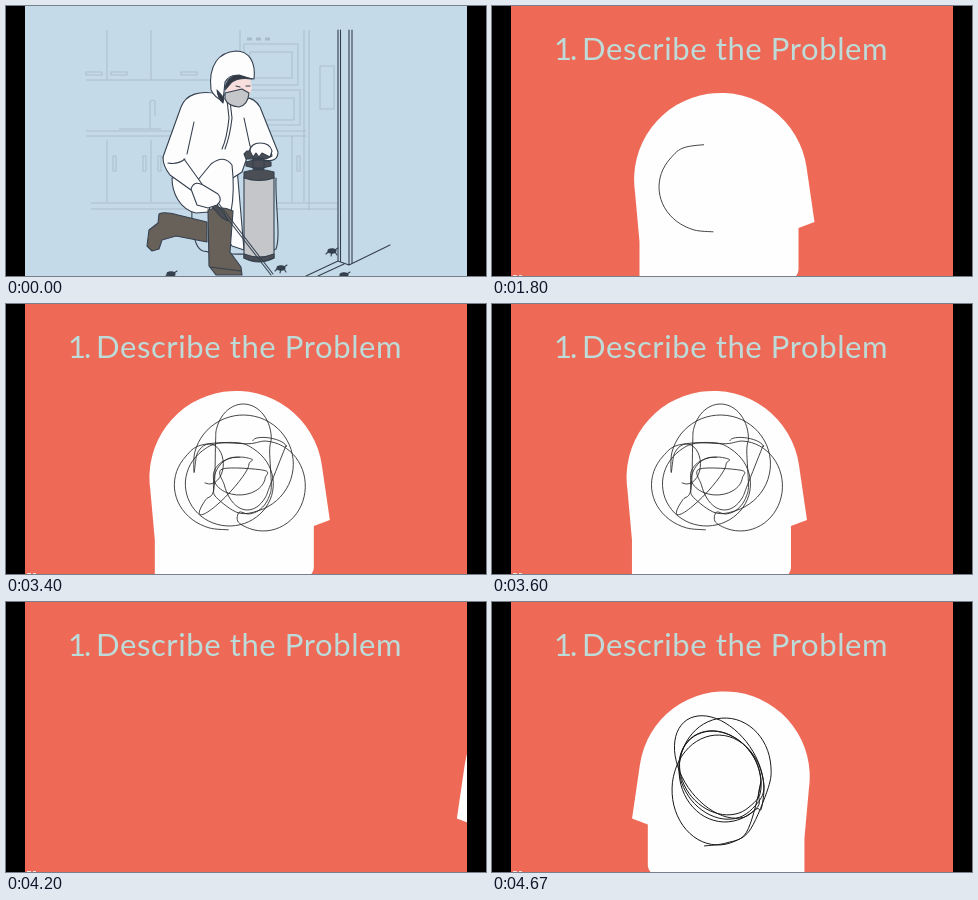
Recreate the animation shown at these times as an HTML page. Size 480x270 px, loop 4790 ms.

```html
<!DOCTYPE html>
<html lang="en">
<head>
<meta charset="utf-8">
<title>Describe the Problem</title>
<style>
  html, body { margin: 0; width: 100%; height: 100%; overflow: hidden; background: #000; }
  svg { display: block; width: 100vw; height: 100vh; }
  .title { font: 400 31px Lato, "Open Sans", sans-serif; letter-spacing: .6px; fill: #bddcd9; }
  .number { letter-spacing: -2px; }
  .kitchen { fill: none; stroke: #a7bac9; stroke-width: .9; }
  .ink { stroke: #35404e; stroke-width: 1.1; stroke-linejoin: round; stroke-linecap: round; fill: none; }
  .suit { fill: #fdfdfe; }
  .boot { fill: #68615a; }
  .grey { fill: #c5c6c9; }
  .dark { fill: #4b4e54; }
  .scribble { fill: none; stroke: #252525; stroke-width: .85; }
  .tangle { fill: none; stroke: #181818; stroke-width: 1; }
</style>
</head>
<body>
<svg viewBox="0 0 480 270">
  <defs>
    <path id="head" fill="#fefefe" d="M147.500 290V236L143 186A86.500 86.500 0 0 1 314.500 161L322.500 216 306.500 222V264Q306 270 301 272V290Z"/>
    <rect id="pull" width="16" height="3"/>
    <rect id="grip" width="3" height="15"/>
    <g id="bug" class="ink">
      <ellipse rx="4" ry="2.200" fill="#35404e"/>
      <path d="M-3 0l-3 3M0 1l-1 4M3 1l2 3M3-1l3-2"/>
    </g>
  </defs>

  <g id="room">
    <rect width="480" height="270" fill="#c5dae9"/>
    <g class="kitchen">
      <path d="M101 24V74M145 24V74M80 74H205M234 24V120M298 24V196M303 24V204"/>
      <path d="M80 125H178M80 130H176M258 125H300M260 130H300M101 134V196M145 134V196M286 130V196"/>
      <path d="M85 197H175M85 203H180M270 197H331M270 203H331M113 123H155M144 123V96q0-2 3-2t2 4v12"/>
      <use href="#pull" x="80" y="66"/><use href="#pull" x="105" y="66"/><use href="#pull" x="175" y="66"/>
      <use href="#grip" x="107" y="150"/><use href="#grip" x="137" y="150"/>
      <use href="#grip" x="152" y="150"/><use href="#grip" x="291" y="150"/>
      <rect x="238" y="38" width="54" height="41"/><rect x="244" y="46" width="42" height="26"/>
      <rect x="238" y="84" width="56" height="35"/><rect x="246" y="92" width="42" height="22"/>
      <path d="M241 33H264" stroke-width="3" stroke-dasharray="5 4"/>
      <rect x="314" y="60" width="14" height="43"/>
    </g>
    <path class="ink" d="M332 24V255M334.500 24V256M343 24V258M346 24V257M332 255L343 259 384 239M332 255L300 270M338 258L312 270"/>
    <use href="#bug" x="326" y="245"/>
    <use href="#bug" x="275" y="262"/>
    <use href="#bug" x="165" y="268"/>
    <use href="#bug" x="338" y="269"/>

    <g class="ink">
      <path d="M188 180C184 205 185 241 197 245C216 249 255 250 270 243C275 230 269 198 270 172"/>
      <path class="boot" d="M201 216L172 209Q158 205 153 208L152 217 143 224 141 240 146 245 153 243 156 234 170 230 201 236Z"/>
      <path class="suit" d="M166 172C166 186 173 203 190 207L203 206 226 240 238 244 231 162Z"/>
      <path class="suit" d="M212 88C194 84 180 88 175 101L157 151Q161 166 174 174L210 183 236 166 245 140 257 154Q272 157 272 146L254 101Q248 91 238 92Z"/>
      <path class="suit" d="M187 180L205 158Q218 148 226 159Q229 184 225 206H204L202 190Z"/>
      <path d="M188 116L181 148M221 94L223 112Q221 132 216 143M224 95L226 112Q224 130 219 143M238 112L244 140"/>
      <path class="boot" d="M202 204Q215 199 227 205L224 246 235 261 236 269H210L203 260ZM204 261L235 265"/>

      <path class="suit" d="M205 84C202 59 213 46 230 45C243 45 250 56 248 73L240 72Q226 65 219 76L217 95Q209 92 205 84Z"/>
      <path fill="#f8dedc" stroke="none" d="M220 78Q229 66 244 72L246 82 243 91 220 88Z"/>
      <path fill="#343a43" d="M219 84Q220 70 233 69L246 73Q233 71 226 76ZM211 84Q212 93 217 97L218 92Z"/>
      <path d="M230 80l4 1M240 80h4"/>
      <path class="grey" d="M219 87L236 83 243 87Q242 99 233 101Q222 100 219 93Z"/>

      <path class="grey" d="M238 171H268V252Q253 260 238 252Z"/>
      <path class="dark" d="M238 172Q253 177 268 172V166Q253 161 238 166ZM238 248Q253 254 268 248V252Q253 259 238 252ZM247 152H258V163H247ZM240 156Q252 152 265 156V160Q252 164 240 160ZM238 148L241 145H265L266 150 260 153H240Z"/>
      <path class="suit" d="M244 145Q245 137 254 137Q264 137 266 145L264 151 256 147 253 151 250 147 247 151Z"/>
    </g>
    <g id="wand" class="ink">
      <path d="M211 199L265 269M213 198L267 268"/>
      <path class="dark" d="M207 194L218 207 222 215 216 212 206 201Z"/>
      <path class="suit" d="M157 152Q157 160 164 169L185 184 196 178 178 153"/>
      <path class="suit" d="M185 183Q188 174 197 179L212 188Q217 194 211 199L202 202 191 199ZM162 157Q171 159 179 153"/>
    </g>
  </g>

  <g id="lesson">
    <rect width="480" height="270" fill="#ee6a57"/>
    <text class="title" y="54"><tspan class="number" x="62">1.</tspan><tspan x="90">Describe the Problem</tspan></text>
    <g id="first">
      <use href="#head"/>
      <path id="loops" class="scribble" pathLength="1"/>
      <path id="rings" class="scribble" pathLength="1"/>
    </g>
    <g id="second">
      <use href="#head" transform="translate(457.700 3.800) scale(-.985 .985)"/>
      <path id="tangle" class="tangle"/>
    </g>
    <path d="M21 269.500h4M27 269.500h3" stroke="#fff" opacity=".8"/>
  </g>
  <path d="M0 0H19V270H0ZM461 0H480V270H461Z"/>
</svg>
<script>
const LOOP = 4790, STEP = 1000 / 15;
const $ = id => document.getElementById(id);
const clamp = v => Math.max(0, Math.min(1, v));

// Points along part of a tilted ellipse, angles in degrees
function arc(cx, cy, rx, ry, from, to, tilt = 0) {
  const rad = Math.PI / 180, count = Math.ceil(Math.abs(to - from) / 24);
  const c = Math.cos(tilt * rad), s = Math.sin(tilt * rad);
  return Array.from({ length: count }, (_, i) => {
    const a = (from + (to - from) * i / count - tilt) * rad;
    const x = rx * Math.cos(a), y = ry * Math.sin(a);
    return [cx + x * c - y * s, cy + x * s + y * c];
  });
}

// One smooth pen line through all arcs
function scribble(id, ...arcs) {
  const p = arcs.flat();
  const at = i => p[Math.max(0, Math.min(p.length - 1, i))];
  let d = 'M' + p[0];
  for (let i = 0; i < p.length - 1; i++) {
    const [a, b, c, e] = [at(i - 1), at(i), at(i + 1), at(i + 2)];
    const c1 = b.map((v, k) => v + (c[k] - a[k]) / 6);
    const c2 = c.map((v, k) => v - (e[k] - b[k]) / 6);
    d += `C${c1} ${c2} ${c}`;
  }
  $(id).setAttribute('d', d);
}

scribble('loops',
  arc(217, 181, 50, 45, 85, 265),
  arc(222, 180, 44, 42, 280, 640),
  arc(256, 182, 42, 45, -110, 150),
  arc(240, 180, 24, 30, 110, -20),
  arc(236, 135, 28, 35, 20, -210),
  arc(217, 184, 36, 7, -150, -420, -47),
  arc(232, 172, 26, 19, -60, -400),
  arc(240, 165, 25, 41, 180, 0),
  arc(262, 140, 17, 6, 30, -190, 10));

scribble('rings',
  arc(202, 160, 14, 20, 110, -180),
  arc(236, 160, 50, 49, 170, 480),
  arc(229, 180, 23, 27, 150, 300));

const turn = (cx, cy, rx, ry, tilt) => arc(cx, cy, rx, ry, 20, -340, tilt);
scribble('tangle',
  arc(214, 200, 56, 44, 92, 20),
  turn(228, 171, 45, 37, 50),
  turn(228, 173, 47, 38, 55),
  turn(227, 165, 57, 37, 55),
  turn(226, 188, 46, 55, 0),
  turn(233, 168, 46, 52, 0),
  arc(229, 176, 40, 45, 20, -10));

// Pulls back slightly before gaining speed
const back = u => 480 * (1.74 * u - .74) * u * u;
const shift = (id, x) => $(id).setAttribute('transform', `translate(${x.toFixed(2)} 0)`);
const reveal = (id, p) => $(id).setAttribute('stroke-dasharray', `${clamp(p)} 2`);
const show = (id, on) => $(id).setAttribute('display', on ? 'inline' : 'none');

function draw(n) {
  show('room', n < 12);
  show('lesson', n >= 12);
  $('wand').setAttribute('transform', `rotate(${-.7 * Math.min(n, 3)} 166 158)`);

  reveal('loops', (n - 26) / 9);
  reveal('rings', (n - 36) / 5);
  show('first', n < 58);
  shift('first', n < 51 ? 0 : -back((n - 50.5) / 7.5));

  show('second', n >= 63);
  shift('second', back(.68 + .07 * (66 - n)) + 3.4);
}

const start = performance.now();
function tick() {
  const t = (performance.now() - start) % LOOP;
  draw(Math.min(70, Math.floor((t + 4) / STEP)));
  requestAnimationFrame(tick);
}
tick();
</script>
</body>
</html>
```
